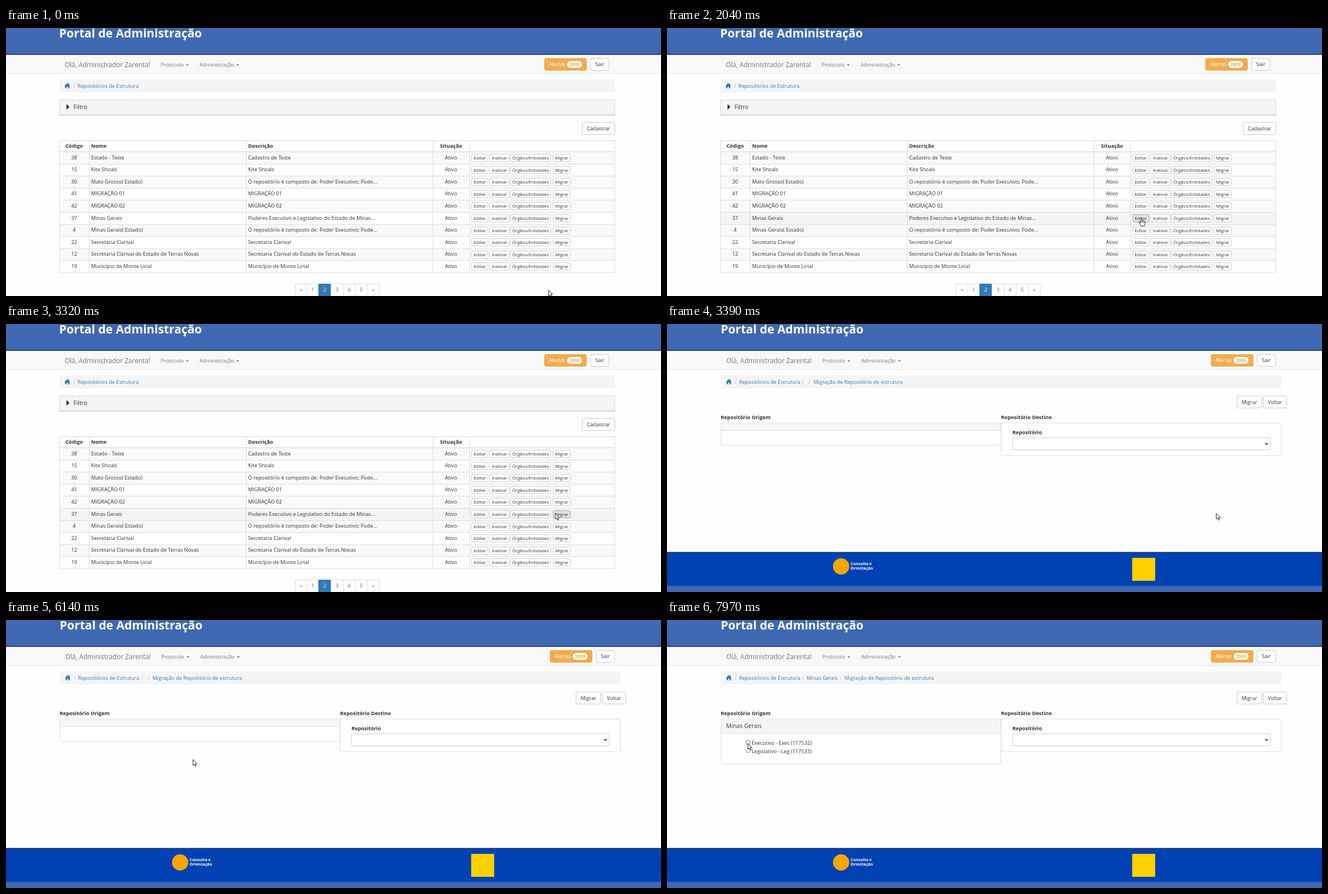
Recreate the animation shown at these times as an HTML page. Size 1168 by 479 pixels, loop 8 s.

```html
<!DOCTYPE html>
<html lang="pt-BR">
<head>
<meta charset="utf-8">
<title>Portal de Administração</title>
<style>
  html, body { margin: 0; width: 100%; height: 100%; overflow: hidden; background: #fefefe; }
  svg { display: block; width: 1168px; height: 479px; font: 9.2px "Open Sans", sans-serif; }
  text { white-space: pre; }
</style>
</head>
<body>
<svg id="stage" viewBox="0 0 1168 479"></svg>
<script>
const LOOP = 8000, TICK = 68;
const PAGE_AT = 3390, LOADED_AT = 6410;
const ROW_TOP = 221, ROW_H = 21.6;
const INK = '#333', LINK = '#337ab7', GREY = '#777', LINE = '#ddd';

// [time, x, y] of the pointer tip
const PATH = [
  [0, 967, 468], [68, 970, 447], [136, 973, 420], [272, 973, 420],
  [816, 966, 344], [952, 966, 344], [1360, 925, 371], [1768, 882, 343],
  [1904, 864, 326], [2040, 846, 340], [2176, 846, 339], [2448, 846, 339],
  [2720, 905, 326], [2992, 981, 338], [3196, 979, 338], [3400, 979, 338],
  [3808, 775, 321], [4080, 775, 321], [4488, 601, 287], [4692, 601, 287],
  [4964, 380, 211], [5110, 380, 211], [5304, 500, 198], [5440, 579, 200],
  [6120, 333, 249], [6324, 333, 249], [6528, 641, 432], [6800, 641, 432],
  [7072, 937, 466], [7412, 122, 232], [7548, 145, 222], [7890, 145, 222],
  [7956, 144, 220]
];

const ROWS = [
  [38, 'Estado - Teste', 'Cadastro de Teste'],
  [15, 'Kite Shoals'],
  [30, 'Mato Grosso( Estado)', 'O repositório é composto de: Poder Executivo; Pode...'],
  [41, 'MIGRAÇÃO 01'],
  [42, 'MIGRAÇÃO 02'],
  [37, 'Minas Gerais', 'Poderes Executivo e Legislativo do Estado de Minas...'],
  [4, 'Minas Gerais( Estado)', 'O repositório é composto de: Poder Executivo; Pode...'],
  [22, 'Secretaria Clarival'],
  [12, 'Secretaria Clarival do Estado de Terras Novas'],
  [19, 'Município de Monte Lirial']
];

const ACTIONS = [
  ['Editar', 830, 859], ['Inativar', 862, 897],
  ['Órgãos/Entidades', 899, 971], ['Migrar', 975, 1006]
];

// Text is placed by its left (or middle) and the centre of its capitals.
function text(x, cy, str, { size = 9.2, fill = INK, bold = false, mid = false } = {}) {
  return `<text x="${x}" y="${(cy + size * .36).toFixed(2)}" font-size="${size}" fill="${fill}"` +
    `${bold ? ' font-weight="700"' : ''}${mid ? ' text-anchor="middle"' : ''}>${str}</text>`;
}
const rect = (x, y, x2, y2, fill, extra = '') =>
  `<rect x="${x}" y="${y}" width="${x2 - x}" height="${y2 - y}" fill="${fill}" ${extra}/>`;
const box = (x, y, x2, y2, fill = '#fff', stroke = LINE, r = 2, extra = '') =>
  rect(x + .5, y + .5, x2 - .5, y2 - .5, fill, `stroke="${stroke}" rx="${r}" ${extra}`);
const path = (d, fill, extra = '') => `<path d="${d}" fill="${fill}" ${extra}/>`;
const button = (x, y, x2, y2, label) =>
  box(x, y, x2, y2, '#fff', '#ccc', 2.6) + text((x + x2) / 2, (y + y2) / 2, label, { mid: true });
const rowLine = i => Math.round(ROW_TOP + ROW_H * i);

function header(dx, rightDx) {
  const caret = x => path(`M${x} 65h5.4l-2.7 2.8z`, GREY);
  return rect(0, 0, 1168, 47, '#3e68b2') + rect(0, 46.7, 1168, 48, '#1d2f55') +
    rect(0, 48, 1168, 81, '#f8f8f8') + rect(0, 81, 1168, 82, '#e5e5e5') +
    `<g transform="translate(${dx})">` +
    text(94.8, 9.5, 'Portal de Administração', { size: 21.1, fill: '#fff', bold: true }) +
    text(104.7, 65.5, 'Olá, Administrador Zarenta!', { size: 11.82, fill: GREY }) +
    text(275.7, 65.3, 'Protocolo', { fill: GREY }) + caret(320.6) +
    text(345.3, 65.3, 'Administração', { fill: GREY }) + caret(410.6) + '</g>' +
    `<g transform="translate(${rightDx})">` +
    box(960, 54, 1035.5, 76, '#f0ad4e', '#eea236', 2.6) +
    text(967.7, 65, 'Alertas', { fill: '#fff' }) +
    rect(1000.5, 59, 1027, 71, '#fff', 'rx="6"') +
    text(1013.8, 65, '2909', { size: 7.88, fill: '#f0ad4e', bold: true, mid: true }) +
    button(1042, 54, 1075.5, 76, 'Sair') + '</g>';
}

function crumbs(x, x2) {
  return rect(x, 92, x2, 115, '#f5f5f5', 'rx="2.6"') +
    path(`M${x + 9} 103.5l5.2-5 1.9 1.8v-1.3h1.4v2.7l1.9 1.8h-1.4v4.2h-2.7v-3h-2.2v3h-2.7v-4.2z`, LINK) +
    slash(x + 25) + link(x + 32.5, 'Repositórios de Estrutura');
}
const slash = x => text(x, 103.3, '/', { fill: '#bbb' });
const link = (x, str) => text(x, 103.3, str, { fill: LINK });

function table() {
  let s = rect(95, 201, 1086, 437, '#fff');
  ROWS.forEach((row, i) => {
    s += rect(95, rowLine(i), 1086, rowLine(i + 1), i % 2 ? '#fff' : '#f9f9f9', `id="row${i}"`);
  });
  for (let i = 1; i < 10; i++) s += rect(95, rowLine(i), 1086, rowLine(i) + 1, LINE);
  s += rect(95, 220.6, 1086, 222, LINE) + box(95, 201, 1086, 437.5, 'none', LINE, 0);
  for (const x of [148, 428, 761, 826]) s += rect(x, 201, x + 1, 437, LINE);

  const bold = { bold: true };
  s += text(121.5, 211, 'Código', { bold: true, mid: true }) + text(151.7, 211, 'Nome', bold) +
    text(431.7, 211, 'Descrição', bold) + text(793.5, 211, 'Situação', { bold: true, mid: true });

  ROWS.forEach(([code, name, info = name], i) => {
    const y = 231.2 + ROW_H * i, top = Math.round(225 + ROW_H * i);
    s += text(121.5, y, code, { mid: true }) + text(151.7, y, name) +
      text(431.7, y, info) + text(793.5, y, 'Ativo', { mid: true });
    ACTIONS.forEach(([label, x, x2], j) => {
      s += box(x, top, x2 + 1, top + 14, '#fff', '#ccc', 2, `id="act${i}${j}"`) +
        text((x + x2 + 1) / 2, top + 7.2, label, { size: 7.88, mid: true });
    });
  });
  return s;
}

function pager() {
  const edges = [515, 536, 557, 579, 601, 622, 644, 665];
  return ['«', 1, 2, 3, 4, 5, '»'].map((label, i) => {
    const on = label === 2;
    return box(edges[i], 457, edges[i + 1] + 1, 479.5, on ? LINK : '#fff', on ? LINK : LINE, 0) +
      text((edges[i] + edges[i + 1] + 1) / 2, 468, label, { fill: on ? '#fff' : LINK, mid: true });
  }).join('');
}

function listPage() {
  return header(0, 0) + crumbs(95, 1086) +
    rect(95, 129, 1086, 156.5, '#ccc', 'rx="2.6"') + box(95, 128, 1086, 155.5, '#f5f5f5', '#d8d8d8', 2.6) +
    path('M108 136l5 5-5 5z', '#1d2939') + text(120.3, 141.5, 'Filtro', { size: 10.5 }) +
    button(1027, 168, 1086, 191, 'Cadastrar') + table() + pager();
}

function originPanel(bottom, headBottom) {
  return box(96, 176.5, 596, bottom) + rect(97, 177.5, 595, headBottom, '#f5f5f5') +
    rect(96, headBottom, 596, headBottom + 1, LINE);
}

function migrationPage() {
  const radio = (cy, id) =>
    `<circle id="${id}" cx="144.7" cy="${cy}" r="3.9" fill="#fff" stroke="#767676" stroke-width=".8"/>`;
  const small = { size: 7.2, fill: '#fff', bold: true };
  return header(1, 10) + crumbs(96, 1096) + slash(240.3) +
    '<g id="empty">' + slash(252.5) + link(261.3, 'Migração de Repositório de estrutura') +
    originPanel(217.5, 190) + '</g>' +
    '<g id="loaded">' + link(249.3, 'Minas Gerais') + slash(308) +
    link(316.6, 'Migração de Repositório de estrutura') + originPanel(258, 202) +
    text(105.5, 189, 'Minas Gerais', { size: 10.5, fill: '#2c3e50' }) +
    radio(219, 'radio') + text(151, 220, 'Executivo - Exec (117532)') +
    radio(233.4, 'radio2') + text(151, 234.3, 'Legislativo - Leg (117533)') + '</g>' +
    button(1016, 128, 1061, 150.5, 'Migrar') + button(1063, 128, 1105.5, 150.5, 'Voltar') +
    text(95.8, 167, 'Repositório Origem', { bold: true }) +
    text(595.8, 167, 'Repositório Destino', { bold: true }) +
    box(595.5, 176.5, 1096, 236) + text(615.9, 193.5, 'Repositório', { bold: true }) +
    box(615.5, 203, 1076, 225.5, '#fff', '#ccc', 2.6) +
    path('M1066.3 212.8l2.7 2.7 2.7-2.7', 'none', 'stroke="#333" stroke-width="1.5"') +
    rect(0, 408, 1168, 468, '#0042b4') + rect(0, 407.5, 1168, 408.8, '#0b2a5c') +
    rect(0, 468, 1168, 479, '#3e68b2') +
    '<circle cx="310.5" cy="433.3" r="14.5" fill="#f9a600"/>' +
    text(327.3, 428, 'Consulta e', small) + text(327.3, 436.3, 'Orientação', small) +
    rect(829.5, 418, 870.5, 459, '#ffd000');
}

const outline = 'stroke="#111" stroke-width=".9" stroke-linejoin="round"';
const pointer = '<g id="pointer">' +
  path('M.4 .5V10.9L2.8 8.7 4.5 12.6 6.2 11.9 4.5 8.1H7.6Z', '#fff', `id="arrow" ${outline}`) +
  '<g id="hand">' +
  path('M-1.3 8.6V1.2Q-1.2 .3-.3 .3T.8 1.2V5Q2.4 4.2 3 5.4 4.6 4.8 5 6 6.6 5.6 6.7 7V9.8L5.4 12V13.8H-.9V12.2L-4.2 8.4Q-4.5 7-3 7Z', '#fff', outline) +
  path('M.8 5V7.6M3 5.4V7.8M5 6V8', 'none', 'stroke="#111" stroke-width=".7"') + '</g></g>';

const stage = document.getElementById('stage');
stage.innerHTML = rect(0, 0, 1168, 479, '#fefefe') +
  `<g id="list">${listPage()}</g><g id="migration">${migrationPage()}</g>${pointer}`;

const el = id => document.getElementById(id);
const show = (id, on) => el(id).setAttribute('display', on ? 'inline' : 'none');

function pointerAt(t) {
  const q = Math.floor(t / TICK) * TICK;
  const n = PATH.findIndex(k => k[0] > q);
  if (n < 0) return PATH[PATH.length - 1].slice(1);
  const [a, b] = [PATH[n - 1], PATH[n]];
  const p = (q - a[0]) / (b[0] - a[0]);
  return [1, 2].map(i => Math.round(a[i] + (b[i] - a[i]) * p));
}

function hover(x, y) {
  let over = false;
  ROWS.forEach((row, i) => {
    const inRow = y >= rowLine(i) && y < rowLine(i + 1);
    el('row' + i).setAttribute('fill', inRow ? '#f3f5f5' : i % 2 ? '#fff' : '#f9f9f9');
    const top = Math.round(225 + ROW_H * i);
    ACTIONS.forEach(([, x1, x2], j) => {
      const hit = x >= x1 && x <= x2 && y >= top && y <= top + 14;
      const btn = el(`act${i}${j}`);
      btn.setAttribute('fill', hit ? '#e3e3e3' : '#fff');
      btn.setAttribute('stroke', hit ? '#a5a5a5' : '#ccc');
      over = over || hit;
    });
  });
  return over;
}

function draw(now) {
  const t = now % LOOP, onList = t < PAGE_AT;
  const [x, y] = pointerAt(t);
  const hand = onList && hover(x, y) && t < 3320;
  show('list', onList);
  show('migration', !onList);
  show('empty', t < LOADED_AT);
  show('loaded', t >= LOADED_AT);
  show('hand', hand);
  show('arrow', !hand);
  el('radio').setAttribute('stroke', t >= 7640 ? '#4f4f4f' : '#767676');
  el('pointer').setAttribute('transform', `translate(${x} ${y})`);
}

const start = performance.now();
function loop() {
  draw(performance.now() - start);
  requestAnimationFrame(loop);
}
loop();
</script>
</body>
</html>
```
